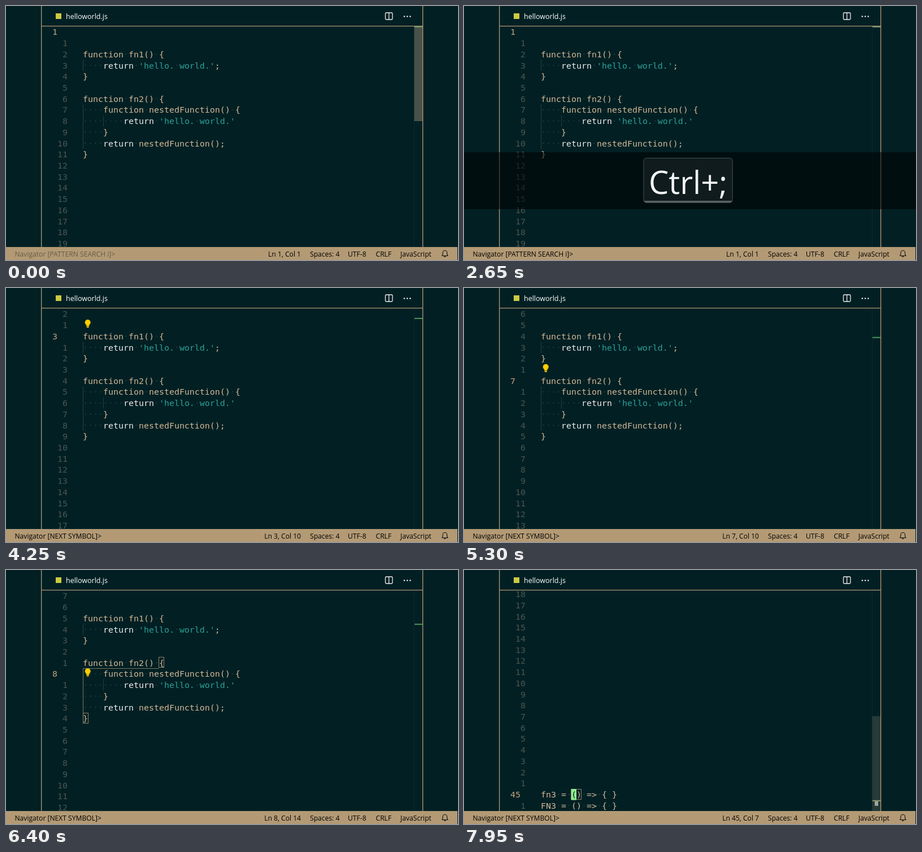
Recreate the animation shown at these times as an HTML page with a canvas. Size 800 by 450 pixels, loop 8 s.

```html
<!DOCTYPE html>
<html lang="en">
<head>
<meta charset="utf-8">
<title>Symbol navigator</title>
<style>
  html, body { margin: 0; width: 100%; height: 100%; overflow: hidden; background: #022024; }
  canvas { display: block; width: 800px; height: 450px; }
</style>
</head>
<body>
<canvas id="stage" width="800" height="450"></canvas>
<script>
const c = document.getElementById('stage').getContext('2d');
const LOOP = 8000;
const BG = '#022024', TAN = '#b39a75', TEXT = '#d1b897';
const MONO = '14.94px "DejaVu Sans Mono", monospace';
const UI = '"Open Sans", "Noto Sans", sans-serif';
const LEFT = 136, CW = 8.994, PITCH = 19.72, LAST_LINE = 46;
const TOP = 36, BOTTOM = 427;

const code = {
  3: 'function fn1() {',
  4: "    return 'hello. world.';",
  5: '}',
  7: 'function fn2() {',
  8: '    function nestedFunction() {',
  9: "        return 'hello. world.'",
  10: '    }',
  11: '    return nestedFunction();',
  12: '}',
  45: 'fn3 = () => { }',
  46: 'FN3 = () => { }'
};

// Caret stops; bulb is the line it hangs on once the lookup is done
const stops = [
  { at: -350, line: 1, col: 1, scroll: 0 },
  { at: 3400, line: 3, col: 10, scroll: 0, bulb: 2 },
  { at: 4450, line: 7, col: 10, scroll: 0, bulb: 6 },
  { at: 5500, line: 8, col: 14, scroll: 0, bulb: 8, pair: [[7, 16], [12, 1]] },
  { at: 6800, line: 45, col: 7, scroll: 516, pair: [[45, 7], [45, 8]] }
];
const BULB_DELAY = 300;

// Key overlays: labels swap while the band stays up
const overlays = [
  { from: 1850, to: 2700, keys: [[1850, 'Ctrl+;']] },
  { from: 2950, to: 4250, keys: [[2950, 'Ctrl+;'], [3400, 'Ctrl+DownArrow']] },
  { from: 4450, to: 5300, keys: [[4450, 'Ctrl+DownArrow']] },
  { from: 5500, to: 6350, keys: [[5500, 'Ctrl+DownArrow']] },
  { from: 6785, to: 7650, keys: [[6785, 'Ctrl+DownArrow']] }
];

const clamp = v => Math.max(0, Math.min(1, v));
const latest = (list, t, time) => list.filter(e => time(e) <= t).pop();
const colX = col => LEFT + (col - 1) * CW;
const lineY = (line, scroll) => 46 + (line - 1) * PITCH - scroll;

function rect(x, y, w, h, fill) {
  c.fillStyle = fill;
  c.fillRect(x, y, w, h);
}

function text(s, x, y, fill, font, align = 'left') {
  c.font = font;
  c.fillStyle = fill;
  c.textAlign = align;
  c.fillText(s, x, y);
}

function stroke(color, width, path) {
  c.strokeStyle = color;
  c.lineWidth = width;
  c.beginPath();
  path();
  c.stroke();
}

function disc(x, y, r, fill) {
  c.fillStyle = fill;
  c.beginPath();
  c.arc(x, y, r, 0, 7);
  c.fill();
}

function caretOn(t, stop) {
  if (stop.line === 1) {
    return t >= 150 && t < 2950 ? Math.floor((t - 150) / 500) % 2 === 0 : t >= 2950;
  }
  return Math.floor((t - stop.at) / 500) % 2 === 0;
}

function drawCode(line, y) {
  const src = code[line];
  if (!src) return;
  for (let i = 0; i < src.length; i++) {
    if (src[i] === ' ') rect(LEFT + (i + .5) * CW - .8, y - .8, 1.6, 1.6, '#2b4a48');
  }
  for (const m of src.matchAll(/'[^']*'|[^\s']+/g)) {
    const fill = m[0][0] === "'" ? '#2ca198' : m[0] === 'return' ? '#eeeeee' : TEXT;
    text(m[0], LEFT + m.index * CW, y + 5.4, fill, MONO);
  }
}

function drawBulb(y) {
  const x = 144.7;
  disc(x, y - 2.2, 5, '#fc0');
  rect(x - 2.6, y + 1, 5.2, 3.4, '#fc0');
  rect(x - 2, y + 5, 4, 2, '#fc0');
}

function drawGuides(stop) {
  const active = '#7a785f', idle = '#24403f';
  const guide = (col, from, to, color) =>
    rect(colX(col), lineY(from, stop.scroll) - PITCH / 2, 1, (to - from + 1) * PITCH, color);
  const inside = stop.line === 8;
  guide(1, 4, 4, idle);
  guide(1, 8, 11, inside ? active : idle);
  guide(5, 9, 9, idle);
  if (inside) rect(LEFT, 174, colX(16) - LEFT, 1, active);
}

function drawScrollbar(t, stop) {
  rect(722, TOP, 1, BOTTOM - TOP, '#0d2a2d');
  const alpha = t < 6800 ? clamp((480 - t) / 800) : clamp((8200 - t) / 800);
  c.globalAlpha = alpha;
  rect(722.5, TOP + stop.scroll * .432, 15, 168, '#797461');
  c.globalAlpha = 1;
  const y = 36.5 + (stop.line - 1) * 8.45;
  if (stop.line === 45) rect(727, y + 1.5, 6, 8, '#a0a8a0');
  const markers = { 1: '#6c8a68', 45: '#8f9d70' };
  rect(723, y - .5, 15, 2, markers[stop.line] || '#4b9658');
}

function drawEditor(t, stop) {
  c.save();
  c.beginPath();
  c.rect(63, TOP, 675, BOTTOM - TOP);
  c.clip();
  drawGuides(stop);
  for (let line = 1; line <= LAST_LINE; line++) {
    const y = lineY(line, stop.scroll);
    if (y < 20 || y > 440) continue;
    if (line === stop.line) text(line, 82, y + 5.4, '#c3a57f', MONO);
    else text(Math.abs(line - stop.line), 109, y + 5.4, '#4c554f', MONO, 'right');
    drawCode(line, y);
  }
  for (const [line, col] of stop.pair || []) {
    c.strokeStyle = '#8d8468';
    c.lineWidth = 1;
    c.strokeRect(Math.floor(colX(col)) + .5, Math.round(lineY(line, stop.scroll) - 10) + .5, 9, 18);
  }
  const ready = latest(stops, t, s => s.at + BULB_DELAY) || stops[0];
  if (ready.bulb && !stop.scroll) drawBulb(lineY(ready.bulb, 0) - 2.6);
  if (caretOn(t, stop)) {
    const x = colX(stop.col), y = lineY(stop.line, stop.scroll);
    rect(x, y - 9.8, 9, 19.7, '#90ee90');
    const ch = (code[stop.line] || '')[stop.col - 1];
    if (ch) text(ch, x, y + 5.4, BG, MONO);
  }
  drawScrollbar(t, stop);
  c.restore();
}

function drawFrame() {
  rect(62, 0, 1.3, BOTTOM, TAN);
  rect(737, 0, 1.3, BOTTOM, TAN);
  rect(62, 35, 676, 1.2, TAN);
  rect(88, 13, 10, 10, '#cbcb41');
  text('helloworld.js', 106, 23, '#fff', '12.5px ' + UI);
  stroke('#eee', 1.3, () => {
    c.roundRect(671.5, 12, 12.5, 12, 1.5);
    c.moveTo(677.7, 12);
    c.lineTo(677.7, 24);
  });
  for (const x of [705, 710.2, 715.4]) disc(x, 18.5, 1.3, '#eee');
}

function drawBell() {
  stroke('#111', 1.1, () => {
    c.moveTo(771.5, 442.5);
    c.lineTo(782, 442.5);
    c.lineTo(780.6, 440);
    c.lineTo(780.6, 437);
    c.arc(776.8, 437, 3.8, 0, Math.PI, true);
    c.lineTo(773, 440);
    c.lineTo(771.5, 442.5);
    c.moveTo(775.3, 443);
    c.arc(776.8, 443, 1.5, Math.PI, 0, true);
  });
}

function drawStatus(t, stop) {
  const font = '12.1px ' + UI;
  const put = (s, x, align) => text(s, x, 444, '#000', font, align);
  rect(0, BOTTOM, 799, 23, TAN);
  const mode = t < 2950 ? 'PATTERN SEARCH i' : 'NEXT SYMBOL';
  const ink = clamp((t - 1750) / 200);
  const mix = v => Math.round(v * (1 - ink));
  text(`Navigator [${mode}]>`, 15.5, 444, `rgb(${mix(100)},${mix(92)},${mix(74)})`, font);
  put(`Ln ${stop.line}, Col ${stop.col}`, 522, 'right');
  put('Spaces: 4', 538);
  put('UTF-8', 605);
  put('CRLF', 654.5);
  put('JavaScript', 698);
  drawBell();
}

function drawOverlay(t) {
  const o = overlays.find(v => t >= v.from && t < v.to);
  if (!o) return;
  const label = latest(o.keys, t, k => k[0])[1];
  c.globalAlpha = 1 - (1 - clamp((t - o.from) / 500)) ** 2;
  rect(0, 259, 800, 101, 'rgba(0,0,0,.55)');
  const font = '56.1px ' + UI;
  c.font = font;
  const w = c.measureText(label).width + 18, x = 396.6 - w / 2;
  c.fillStyle = 'rgba(128,140,140,.11)';
  c.beginPath();
  c.roundRect(x, 269.5, w, 79, 5);
  c.fill();
  c.save();
  c.clip();
  rect(x, 345, w, 4, '#566060');
  c.restore();
  stroke('#465050', 1, () => c.roundRect(x, 269.5, w, 79, 5));
  text(label, 396.6, 333, '#f2f4f4', font, 'center');
  c.globalAlpha = 1;
}

function draw(now) {
  const t = now % LOOP;
  const stop = latest(stops, t, s => s.at);
  rect(0, 0, 800, 450, BG);
  drawEditor(t, stop);
  drawFrame();
  drawStatus(t, stop);
  drawOverlay(t);
}

const start = performance.now();
function tick() {
  draw(performance.now() - start);
  requestAnimationFrame(tick);
}
tick();
</script>
</body>
</html>
```
